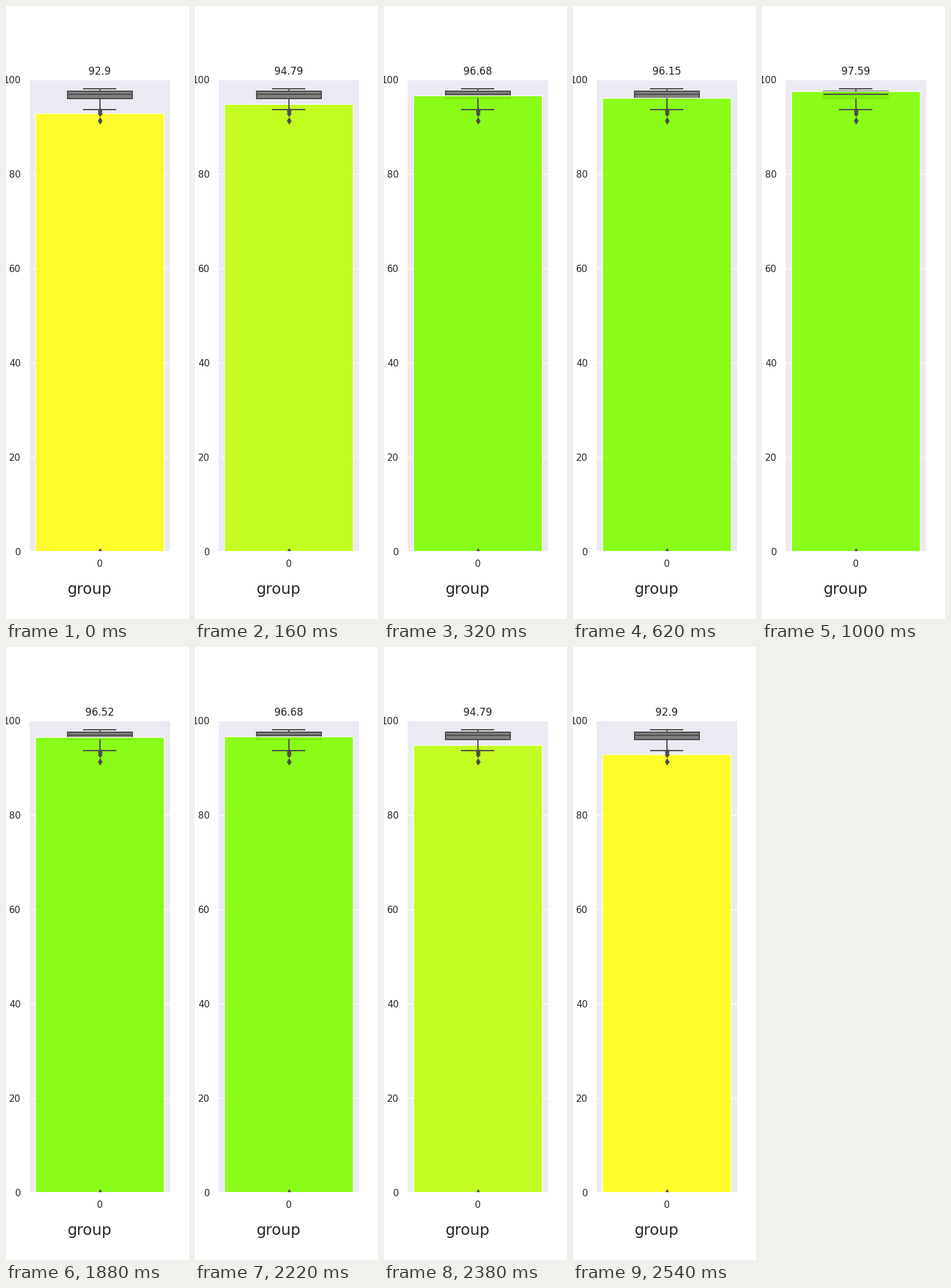
A matplotlib script that plays this animation: 300x1000 px, repeating every 2.56 s.

```python
import matplotlib.pyplot as plt
import numpy as np
from matplotlib.animation import FuncAnimation

plt.rcParams.update({
    "font.family": "DejaVu Sans",
    "text.color": ".15", "xtick.color": ".15", "ytick.color": ".15",
    "axes.facecolor": "#EAEAF2", "axes.edgecolor": "white",
    "axes.linewidth": 1.25, "axes.axisbelow": True,
    "grid.color": "white", "grid.linewidth": 1,
    "lines.solid_capstyle": "round",
})

INK = "#4d4d4d"
STEPS = 32
KEY_SCORES = {0: 92.9, 8: 96.68, 15: 96.15, 17: 96.52, 26: 97.59, 31: 98.05}


def build_timeline():
    """Every fourth score is held for five ticks; the run then plays backwards."""
    scores = np.interp(np.arange(STEPS), list(KEY_SCORES), list(KEY_SCORES.values()))
    holds = np.where(np.arange(STEPS) % 4 == 2, 5, 1)
    forward = np.repeat(scores, holds)
    return np.concatenate([forward, forward[::-1]])


def bar_color(score):
    if score < 94:
        return "#ffff14"
    return "#bfff0a" if score < 96 else "#7fff00"


timeline = build_timeline()

fig, ax = plt.subplots(figsize=(3, 10), dpi=100)
fig.subplots_adjust(left=0.125, right=0.9, bottom=0.11, top=0.88)

stats = dict(med=96.88, q1=95.97, q3=97.55, whislo=93.64, whishi=98.08,
             fliers=[93.4, 92.9, 91.25, 0])
line = dict(color=INK, linewidth=1.5)
ax.bxp([stats], positions=[0], widths=0.4, capwidths=0.2, patch_artist=True,
       boxprops=dict(facecolor="#808080", edgecolor=INK, linewidth=1.5, zorder=1),
       whiskerprops=line, capprops=line, medianprops=line,
       flierprops=dict(marker="d", markersize=5, markerfacecolor=INK,
                       markeredgecolor=INK))
bar = ax.bar(0, timeline[0], width=0.8, alpha=0.9, edgecolor="white",
             linewidth=1, zorder=1.1)[0]

ax.set_xlim(-0.44, 0.44)
ax.set_ylim(0, 100)
ax.set_xticks([0], ["0"])
ax.set_yticks(range(0, 101, 20))
ax.tick_params(length=0, pad=9.5, labelsize=11)
ax.grid(axis="y")
ax.text(-0.2, -9, "group", fontsize=18)
value_label = ax.text(0, 101, "", fontsize=12, ha="center")


def update(frame):
    score = timeline[frame]
    bar.set_height(score)
    bar.set_facecolor(bar_color(score))
    value_label.set_text(f"{round(score, 2):g}")
    return bar, value_label


anim = FuncAnimation(fig, update, frames=len(timeline), interval=20,
                     repeat=True, repeat_delay=0)
plt.show()
```
